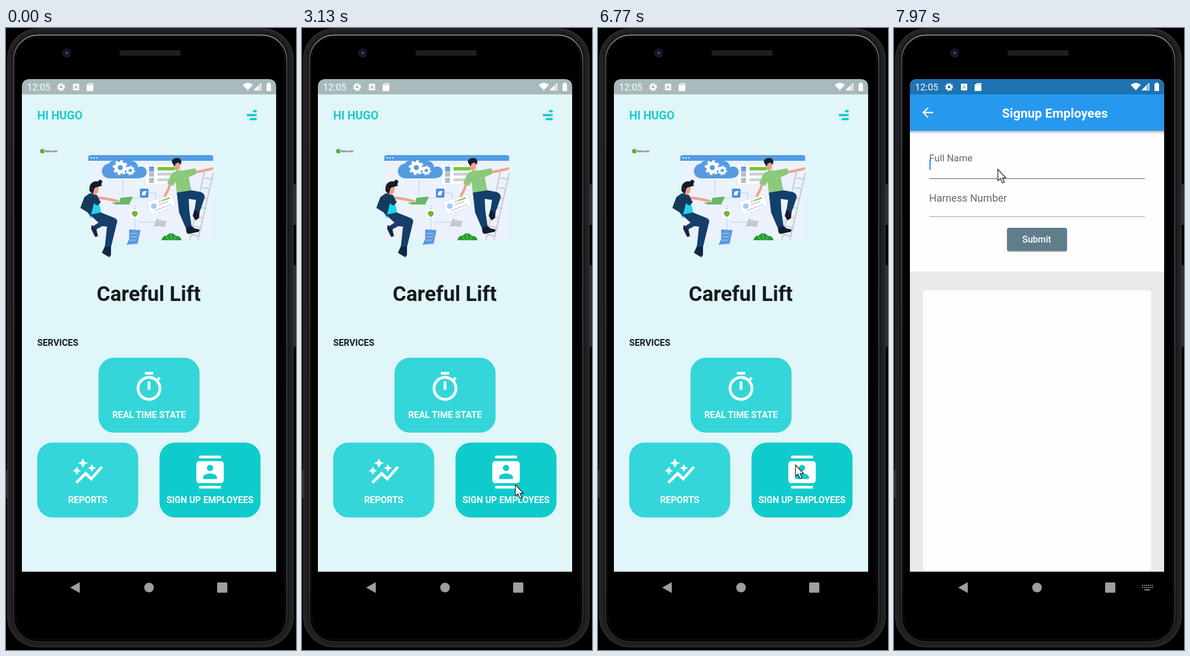
These frames come from a looping animation (511 px wide and 1096 px high, 8 s). An HTML page:

```html
<!DOCTYPE html>
<html lang="en">
<head>
<meta charset="utf-8">
<title>Phone app demo</title>
<style>
  html, body { margin: 0; width: 100%; height: 100%; overflow: hidden; background: #000; }
  svg { display: block; width: 511px; height: 1096px; font-family: Roboto, sans-serif; }
  .label { font-size: 15.8px; font-weight: 700; }
  .mid { text-anchor: middle; }
  .limb { fill: none; stroke-linecap: round; stroke-linejoin: round; }
  .field { font-size: 18.2px; fill: #686868; }
</style>
</head>
<body>
<svg viewBox="0 0 511 1096">
  <defs>
    <clipPath id="screen"><path d="M28 958V104q0-14 14-14H462q14 0 14 14V958Z"/></clipPath>
    <linearGradient id="metal" x2="0" y2="1">
      <stop stop-color="#85848a"/><stop offset=".05" stop-color="#4b4a50"/>
      <stop offset=".9" stop-color="#3a393e"/><stop offset="1" stop-color="#2c2b30"/>
    </linearGradient>
    <linearGradient id="shade" x2="0" y2="1">
      <stop stop-opacity=".3"/><stop offset="1" stop-opacity="0"/>
    </linearGradient>
    <g id="gear">
      <circle r="5" fill="none" stroke="#fff" stroke-width="4"/>
      <circle r="7.6" fill="none" stroke="#fff" stroke-width="2.6" pathLength="16" stroke-dasharray="1"/>
    </g>
  </defs>

  <!-- Phone body -->
  <g fill="#2c2b2f">
    <path d="M505 275h6v72h-6zM505 418h6v144h-6zM0 778h3v50H0z"/>
    <rect x="3" y="1.500" width="503" height="1089" rx="54" fill="#19181b" stroke="#37363b" stroke-width="1.500"/>
    <rect x="7" y="5" width="495" height="1082" rx="50" fill="none" stroke="#222126" stroke-width="5"/>
    <rect x="13.500" y="12.500" width="481" height="1069" rx="43" fill="#000" stroke="url(#metal)" stroke-width="1.800"/>
    <rect x="17" y="16" width="474" height="1062" rx="40" fill="#000" stroke="#161518"/>
    <circle cx="107" cy="44" r="8" fill="#19191e"/>
    <circle cx="107" cy="44" r="4.500" fill="#101a3c"/>
    <circle cx="107" cy="44" r="2" fill="#37529c"/>
    <rect x="200" y="39" width="108" height="10" rx="4" fill="#1d1c20"/>
  </g>

  <g clip-path="url(#screen)">
    <g id="home">
      <rect x="28" y="90" width="448" height="868" fill="#e0f6f9"/>
      <text x="55" y="161" font-size="20" font-weight="700" fill="#16cbca">HI HUGO</text>
      <path class="limb" d="M437 146.500H440M426 153.500H440M431 160.500H440" stroke="#16cbca" stroke-width="4"/>
      <circle cx="64" cy="217" r="4" fill="#58b23c"/>
      <text x="69" y="219" font-size="5.600" fill="#222">Belvoran</text>

      <!-- Illustration: browser window and ladder -->
      <rect x="145" y="224" width="220" height="150" rx="4" fill="#ebf2fc"/>
      <path d="M145 234v-6q0-4 4-4H361q4 0 4 4v6z" fill="#539be5"/>
      <path class="limb" d="M150 229h.1m5 0h.1m5 0h.1" stroke="#fff" stroke-width="2.400"/>
      <path d="M247 242h52v33h-52z" fill="#fff"/>
      <path d="M252 244h9v9h-9z" fill="#6b9ee6"/>
      <path d="M252 254h9v8h-9zM252 264h9v9h-9z" fill="#b9bdc5"/>
      <path d="M267 245h31v6h-31z" fill="#71c837"/>
      <path d="M267 255h31v5h-31zM267 265h31v5h-31z" fill="#cdd0d6"/>
      <path d="M350 250 324 374M365 256 338 374M349 264 364 267M346 281 360 284M342 298 356 301M338 315 353 318M335 332 349 335M331 349 345 352M328 364 341 367" fill="none" stroke="#c5c9cf" stroke-width="2"/>
      <path d="M206 268V296M250 291H264V305M227 313V355M234 342H262M216 300H236" fill="none" stroke="#76a3df" stroke-dasharray="2 2"/>
      <path d="M183 265a13 13 0 0 1-2-26 10 10 0 0 1 9-5 15 15 0 0 1 27 0q14-1 16 12a10 10 0 0 1 2 19z" fill="#559be2"/>
      <circle cx="238" cy="254" r="10" fill="#559be2"/>
      <use href="#gear" transform="translate(201.500 246) scale(1.500)"/>
      <use href="#gear" transform="translate(219 251) scale(.950)"/>
      <rect x="236" y="283" width="15" height="16" rx="2" fill="#508edb"/>
      <path d="m241 288 7-1-3 8h-6z" fill="#fff"/>
      <g transform="translate(274 310) rotate(-20)">
        <rect x="-23" y="-11" width="46" height="23" rx="2" fill="#fff" stroke="#d8e2f1"/>
        <circle cx="-14" cy="-1" r="5" fill="#a3c7f5"/>
        <path d="M-5-5H17M-5 0H13M-15 7H16" stroke="#cbd1db" stroke-width="2"/>
        <path d="M4-5h13" stroke="#71c837" stroke-width="2"/>
      </g>
      <path d="M220 320h14v14h-14z" fill="#fff"/>
      <path d="m227 322 5 2v4q-1 3-5 5-4-2-5-5v-4z" fill="#70b934"/>
      <path d="m265 336 8 3 10 1-4 11-9-2-10 1z" fill="#c5c8ce"/>
      <path d="m217 355 20 1-5 24-20 2 5-9z" fill="#5c98df"/>
      <path d="M219 362h13m-13 6h12m-13 6h11" stroke="#9bc4f2" stroke-width="1.500"/>
      <path d="M274 374q2-9 9-8 8-9 16 0 9 0 10 8z" fill="#239b35"/>
      <path d="M291 363v11m-8-7 4 7m13-6-5 6" stroke="#8ce068"/>

      <!-- Man -->
      <path class="limb" d="M326 255 345 252 363 248M290 273 286 284 280 296" stroke="#f3a289" stroke-width="4.500"/>
      <path d="M292 256 301 251 313 251 334 247 335 257 322 263 327 288 301 292 299 271 294 278 284 274z" fill="#8bc97c"/>
      <path d="M301 290 327 286 343 289Q351 292 350 299L341 325 332 321 335 303 322 301 323 322 327 349 317 353 305 325z" fill="#133f6c"/>
      <path d="m332 320 9 5-1 10-6 4-5-8zM317 352l9-4 6 5 9 2-1 4-19 4-3-3z" fill="#131e32"/>
      <path d="M295 238h12l-1 10-4 4-5-3z" fill="#f3a289"/>
      <path d="M292 236q1-7 9-7 8 0 8 8l-2 4-3-4-5 2-2 5z" fill="#15212d"/>

      <!-- Woman -->
      <path class="limb" d="M162 299 178 301 196 305" stroke="#f3a289" stroke-width="4.500"/>
      <path d="M150 298 163 304 168 327 148 335z" fill="#20d4ef"/>
      <path d="M148 291 160 294 167 307 161 313 155 309 149 332 144 325 131 317 138 298z" fill="#163a5c"/>
      <path d="M148 329 167 325 192 335Q198 338 195 345L185 386 174 387 178 350 170 349 157 356 152 350 163 343z" fill="#173e69"/>
      <path d="m151 347 8 6 3 14-5 1-7-14zM174 385l11 0 0 15-3 4-13-8z" fill="#112943"/>
      <path d="M151 278h13l-2 12-6 4-5-2z" fill="#f3a289"/>
      <path d="M147 287q-1-15 11-17 9 0 11 8l-8 2-5 2-3 11z" fill="#131c27"/>
      <circle cx="166" cy="271" r="3.500" fill="#131c27"/>
      <path d="m202 299 22-2-7 14-24 0-7-3 13-1z" fill="#69b66a"/>

      <text class="mid" x="251.500" y="481" font-size="36.500" font-weight="700" fill="#171a1e">Careful Lift</text>
      <text class="label" x="55" y="559.500" fill="#171a1e">SERVICES</text>
      <g id="cards" fill="#fff"></g>
    </g>
    <rect id="scrim" x="28" y="90" width="448" height="868" opacity="0"/>

    <g id="signup">
      <path d="M28 90h448v868H28z" fill="#fdfefd"/>
      <path d="M28 429h448v529H28z" fill="#e9eae9"/>
      <rect x="50" y="463" width="404" height="496" rx="4" fill="#d9dad8"/>
      <rect x="50.500" y="462.500" width="403" height="495" rx="4" fill="#fdfefc"/>
      <path d="M28 181h448v6H28z" fill="url(#shade)"/>
      <path d="M28 90h448v91H28z" fill="#2699ef"/>
      <path d="M69 149H52M60 140.500 51.500 149 60 157.500" fill="none" stroke="#fff" stroke-width="2.300"/>
      <text class="mid" x="283.500" y="158" font-size="22.500" font-weight="700" fill="#fff">Signup Employees</text>
      <text id="nameLabel" class="field">Full Name</text>
      <text class="field" x="62" y="305.500">Harness Number</text>
      <path id="nameLine" d="M62 265.500H442" stroke="#929292"/>
      <path d="M62 332.500H442" stroke="#9c9ea8"/>
      <path d="M63.500 232V250" id="caret" stroke="#2196f3" stroke-width="2.200"/>
      <rect x="199" y="354" width="106" height="41" rx="4" opacity=".22"/>
      <rect x="199" y="352" width="106" height="41" rx="4" fill="#607d8b"/>
      <text class="mid" x="251.500" y="378" font-size="16" font-weight="500" fill="#fff">Submit</text>
    </g>

    <!-- Status bar -->
    <path d="M28 90h448v27H28z" opacity=".25"/>
    <g fill="#fff">
      <text x="37" y="110" font-size="16.500">12:05</text>
      <use href="#gear" transform="translate(97 104) scale(.8)"/>
      <rect x="118" y="98" width="11" height="12" rx="1"/>
      <path d="m121 107 2.500-6 2.500 6m-4-2h3" fill="none" stroke="#8b9999"/>
      <path d="M142 100.500 146 97h8v14h-12z"/>
      <path d="M146.500 98v3m2.500-3v3m2.500-3v3" stroke="#8b9999"/>
      <path d="M417 100q9-7 18 0l-9 10z"/>
      <path d="M436 110 450 96v14z" opacity=".45"/>
      <path d="M436 110 445 101v9z"/>
      <path d="M437 109.500H449.500V97.500z" fill="none" stroke="#fff"/>
      <path d="M459 98h2v-2h4v2h2v13h-8z"/>
    </g>
  </g>

  <!-- Navigation bar -->
  <g fill="#9e9e9e">
    <path d="M113 986 130 976.500v19z"/>
    <circle cx="252" cy="986" r="8.500"/>
    <rect x="372" y="977" width="18" height="18" rx="1.500"/>
    <g id="keyboard" fill="none" stroke="#8f8f8f" stroke-width="2">
      <path d="M437 982H456M437 986H456" stroke-dasharray="2 1.400"/><path d="M441 990H451"/>
    </g>
  </g>

  <path id="cursor" d="M0 0V20L4.500 16 8 24 11.500 22.500 8 15H14Z" fill="#fff" stroke="#111" stroke-width="1.200"/>
</svg>

<script>
const LOOP = 8000, OPEN = 6777, FOCUS = 7930;
const $ = id => document.getElementById(id);
const clamp = v => Math.min(1, Math.max(0, v));
const progress = (t, start, length) => clamp((t - start) / length);
const mix = (a, b, p) => a + (b - a) * p;
const show = (el, on) => el.setAttribute('visibility', on ? 'visible' : 'hidden');

const icons = {
  timer: 'M15 1H9v2h6V1zm-4 13h2V8h-2v6zm8.03-6.61l1.42-1.42c-.43-.51-.9-.99-1.41-1.41l-1.42 1.42C16.07 4.74 14.12 4 12 4c-4.97 0-9 4.03-9 9s4.02 9 9 9 9-4.03 9-9c0-2.12-.74-4.07-1.97-5.61zM12 20c-3.87 0-7-3.13-7-7s3.13-7 7-7 7 3.13 7 7-3.13 7-7 7z',
  graph: 'M14.06 9.94L12 9l2.06-.94L15 6l.94 2.06L18 9l-2.06.94L15 12zM4 14l.94-2.06L7 11l-2.06-.94L4 8l-.94 2.06L1 11l2.06.94zM8.5 9l1.09-2.41L12 5.5 9.59 4.41 8.5 2 7.41 4.41 5 5.5l2.41 1.09zM4.5 20.5l6-6.01 4 4L23 8.93l-1.41-1.41-7.09 7.97-4-4L3 19z',
  contact: 'M20 0H4v2h16V0zM4 24h16v-2H4v2zM20 4H4c-1.1 0-2 .9-2 2v12c0 1.1.9 2 2 2h16c1.1 0 2-.9 2-2V6c0-1.1-.9-2-2-2zm-8 2.75c1.24 0 2.25 1.01 2.25 2.25s-1.01 2.25-2.25 2.25S9.75 10.24 9.75 9 10.76 6.75 12 6.75zM17 17H7v-1.5c0-1.67 3.33-2.5 5-2.5s5 .83 5 2.5V17z'
};
const card = (x, y, color, icon, iconY, label) => `
  <rect x="${x}" y="${y}" width="178" height="132" rx="27" fill="${color}"/>
  <path transform="translate(${x + 60} ${y + iconY}) scale(2.42)" d="${icons[icon]}"/>
  <text class="label mid" x="${x + 89}" y="${y + 106}">${label}</text>`;
$('cards').innerHTML =
  card(163, 581, '#34d6d9', 'timer', 22.5, 'REAL TIME STATE') +
  card(55, 730.5, '#34d6d9', 'graph', 23, 'REPORTS') +
  card(270.5, 730.5, '#0fcbcc', 'contact', 23, 'SIGN UP EMPLOYEES');

// Pointer moves: start, end, x, y; it rests in between.
const moves = [
  [30, 500, 440, 925], [800, 1600, 376, 804], [1630, 1770, 375, 807], [2100, 2370, 377, 803],
  [2630, 2700, 376, 804], [3130, 3170, 376, 806], [3570, 3800, 362, 650], [4000, 4330, 341, 322],
  [4670, 4700, 340, 345], [5040, 5040, 339, 370], [5240, 5270, 337, 430], [5570, 5600, 335, 520],
  [5740, 5770, 334, 600], [6270, 6300, 332, 624], [6600, 6740, 348, 770], [7340, 7370, 345, 764],
  [7600, 7890, 183, 249]
];
function pointer(t) {
  let x = 515, y = 1010;
  for (const [start, end, toX, toY] of moves) {
    const from = start - 30;
    if (t < from) break;
    let p = progress(t, from, end - from);
    p = p * p * (3 - 2 * p);
    x = mix(x, toX, p);
    y = mix(y, toY, p);
  }
  return [x, y];
}

const bezier = (a, b, c, d, s) =>
  a * (1 - s) ** 3 + 3 * b * s * (1 - s) ** 2 + 3 * c * s * s * (1 - s) + d * s ** 3;

// Two joined cubics: a quick start followed by a very slow finish.
function fastOutSlowIn(p) {
  const [xs, ys] = p < 1 / 6
    ? [[0, .05, .1333, 1 / 6], [0, 0, .06, .4]]
    : [[1 / 6, .2083, .25, 1], [.4, .82, 1, 1]];
  let low = 0, high = 1;
  for (let i = 0; i < 20; i++) {
    const s = (low + high) / 2;
    if (bezier(...xs, s) < p) low = s; else high = s;
  }
  return bezier(...ys, low);
}
const zoom = scale => `translate(252 524) scale(${scale}) translate(-252 -524)`;

function draw(t) {
  const p = progress(t, OPEN, 300), eased = fastOutSlowIn(p);
  $('home').setAttribute('transform', zoom(mix(1, 1.05, eased)));
  $('scrim').setAttribute('opacity', .6 * progress(p, .14, .21));
  $('signup').setAttribute('transform', zoom(mix(.85, 1, eased)));
  $('signup').setAttribute('opacity', progress(p, .08, .12));

  const focused = t >= FOCUS, lift = progress(t, FOCUS, 165);
  const label = $('nameLabel');
  label.setAttribute('transform', `translate(62 ${mix(238, 226, lift)}) scale(${mix(1, .75, lift)})`);
  $('nameLine').setAttribute('stroke', focused ? '#555d62' : '#929292');
  show($('caret'), focused);
  show($('keyboard'), focused);

  const [x, y] = pointer(t);
  $('cursor').setAttribute('transform', `translate(${x} ${y})`);
  show($('cursor'), t >= 30);
}
function tick() {
  draw(performance.now() % LOOP);
  requestAnimationFrame(tick);
}
tick();
</script>
</body>
</html>
```
